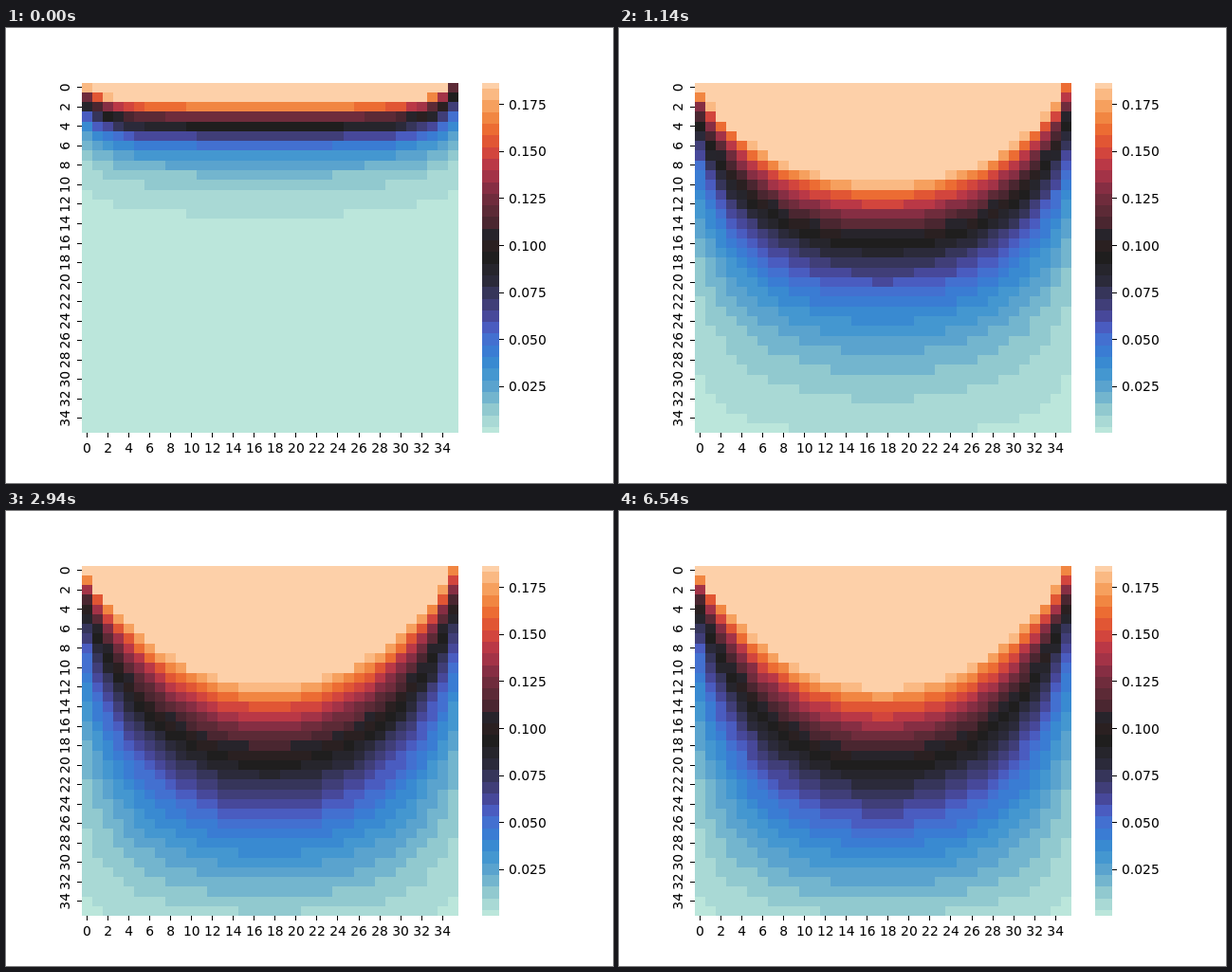
Write an HTML page with a canvas that moves like this. It is 640x480 px and loops after 8000 ms.

```html
<!DOCTYPE html>
<html>
<head>
<meta charset="utf-8">
<style>
html, body { margin: 0; width: 100%; height: 100%; overflow: hidden; background: #fff; }
canvas { display: block; }
</style>
</head>
<body>
<canvas id="stage" width="640" height="480"></canvas>
<script>
const ctx = document.getElementById('stage').getContext('2d');
const N = 36, STEP_MS = 30, LOOP_MS = 8000, LAST_STEP = 218, WARM_UP = 4;
const LEFT = 80, TOP = 57.6, CELL_W = 11.02, CELL_H = 10.267;
const V_MAX = 0.1858;
const palette = ('bbe6db a9d9d5 91c9cf 73b5ce 5aa3ce 4497d0 398ad1 3a7cd3 4370d0 4a5cc0 47489a ' +
  '403e78 36355a 2b2a3a 26252c 1f1e1e 2a2021 27242b 4a2630 5c2a36 6f2c3c 862e43 a33347 ba3846 ' +
  'd2453d e15634 ec6c33 f18642 f6a05e fab983 fdd0a9').split(' ').map(c => '#' + c);
const LEVELS = palette.length - 1;

// Heat conduction: warm air above the plate, heat lost through the other edges.
const RATE = 3.2, AIR = 0.503, GAIN = 1 / 3.3;
const LOSS_LEFT = 0.42, LOSS_RIGHT = 0.38, LOSS_BOTTOM = 0.4;

// One implicit time step, solved by over-relaxation.
function diffuse(old) {
  const u = old.slice();
  for (let sweep = 0; sweep < 36; sweep++) {
    for (let y = 0, i = 0; y < N; y++) {
      for (let x = 0; x < N; x++, i++) {
        let flow = 0, weight = 0;
        const link = (g, v) => { weight += g; flow += g * v; };
        if (x > 0) link(1, u[i - 1]); else link(LOSS_LEFT, 0);
        if (x < N - 1) link(1, u[i + 1]); else link(LOSS_RIGHT, 0);
        if (y < N - 1) link(1, u[i + N]); else link(LOSS_BOTTOM, 0);
        if (y > 0) link(1, u[i - N]); else if (x < N - 1) link(GAIN, AIR);
        const next = (old[i] + RATE * flow) / (1 + RATE * weight);
        u[i] += 1.35 * (next - u[i]);
      }
    }
  }
  return u;
}

const states = [];
let field = new Float64Array(N * N);
for (let s = 0; s < WARM_UP + LAST_STEP; s++) {
  field = diffuse(field);
  if (s >= WARM_UP - 1) states.push(field);
}

function block(x0, y0, x1, y1, color) {
  const [l, t, r, b] = [x0, y0, x1, y1].map(Math.round);
  ctx.fillStyle = color;
  ctx.fillRect(l, t, r - l, b - t);
}

function label(text, x, y, align, angle = 0) {
  ctx.save();
  ctx.translate(x, y);
  ctx.rotate(angle);
  ctx.textAlign = align;
  ctx.fillText(text, 0, 0);
  ctx.restore();
}

function drawAxes() {
  ctx.fillStyle = '#fff';
  ctx.fillRect(0, 0, 640, 480);
  for (let k = 0; k <= LEVELS; k++) {
    const edge = f => 427 - 369 * Math.min(1, Math.max(0, f / LEVELS));
    block(502, edge(k + 0.5), 520, edge(k - 0.5), palette[k]);
  }
  ctx.fillStyle = '#000';
  ctx.font = '13.89px "DejaVu Sans", sans-serif';
  for (let n = 0; n < N; n += 2) {
    const x = LEFT + CELL_W * (n + 0.5), y = TOP + CELL_H * (n + 0.5);
    ctx.fillRect(Math.floor(x), 427, 1, 5);
    ctx.fillRect(75, Math.floor(y), 5, 1);
    label(n, x, 448, 'center');
    label(n, 67, y, 'center', -Math.PI / 2);
  }
  for (let n = 1; n <= 7; n++) {
    const y = 378 - (n - 1) * 49.65;
    ctx.fillRect(520, Math.round(y), 5, 1);
    label((n * 0.025).toFixed(3), 530, Math.ceil(y) + 5, 'left');
  }
}

function drawField(u) {
  for (let y = 0, i = 0; y < N; y++) {
    for (let x = 0; x < N; x++, i++) {
      const level = Math.min(LEVELS, Math.round(u[i] / V_MAX * LEVELS));
      block(LEFT + CELL_W * x, TOP + CELL_H * y,
        LEFT + CELL_W * (x + 1), TOP + CELL_H * (y + 1), palette[level]);
    }
  }
}

function render() {
  const step = Math.floor(performance.now() % LOOP_MS / STEP_MS);
  drawField(states[Math.min(step, LAST_STEP)]);
  requestAnimationFrame(render);
}

drawAxes();
render();
</script>
</body>
</html>
```
